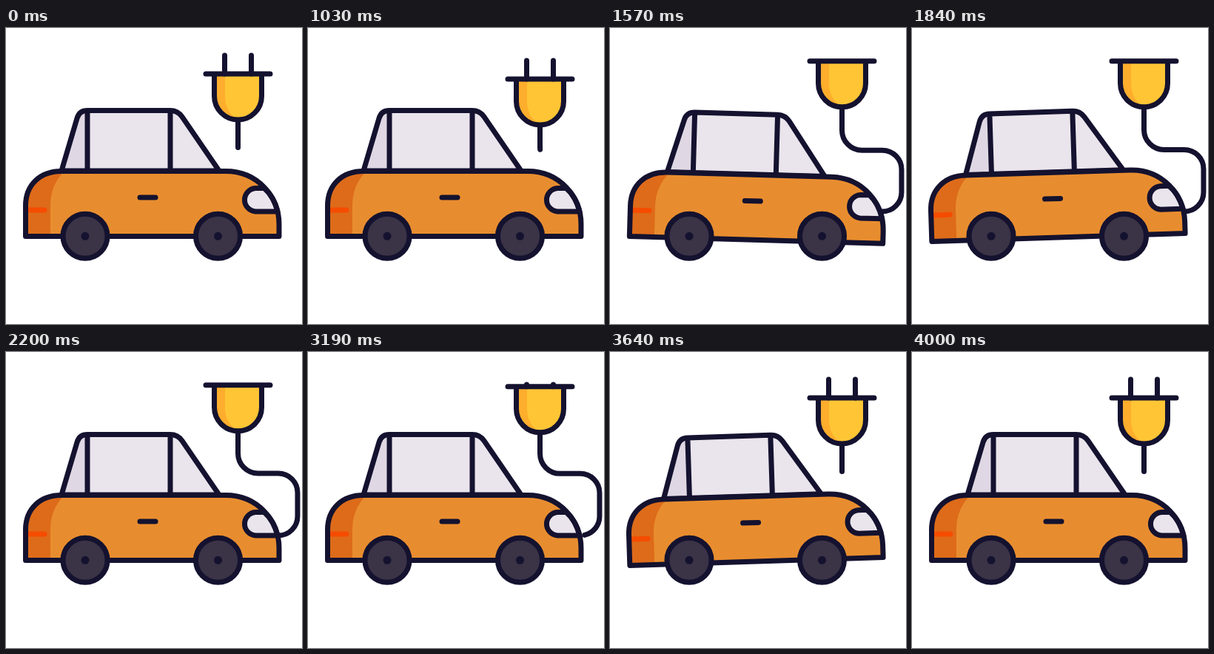
Recreate the animation shown at these times as an HTML page. Size 400 by 400 pixels, loop 4030 ms.

```html
<!DOCTYPE html>
<html lang="en">
<head>
<meta charset="utf-8">
<title>Electric car</title>
<style>
  html, body { margin: 0; height: 100%; overflow: hidden; background: #fff; }
  svg { display: block; width: 100%; height: 100%; }
  .line { fill: none; stroke: #14122f; stroke-width: 7; stroke-linecap: round; stroke-linejoin: round; }
  .glass { fill: #eae4ec; }
  .wheel { fill: #3b3346; }
  .hub { fill: #14122f; }
</style>
</head>
<body>
<svg viewBox="0 0 400 400">
  <defs>
    <path id="body" d="M26.5 281.5V240C26.5 212 46 193.5 75 193.5H297C340 193.5 369 228 369 265V281.5Z"/>
    <g id="wheel">
      <circle class="line wheel" r="30"/>
      <circle class="hub" r="5.5"/>
    </g>
  </defs>
  <path id="cord" class="line"/>
  <g id="plug">
    <path fill="#ffc535" d="M281.5 0V30a32 32 0 0 0 64 0V0Z"/>
    <path fill="#ffad2c" d="M281.5 0H296V32Q297 52 313.5 62A32 32 0 0 1 281.5 30Z"/>
    <path class="line" d="M281.5 0V30a32 32 0 0 0 64 0V0M270 0H357"/>
    <path id="prongs" class="line"/>
  </g>
  <g id="car">
    <path class="glass" d="M75 193L96 122Q99 111.5 110 111.5H222Q232 111.5 238 120L288 193Z"/>
    <path fill="#dfd8e4" d="M75 193L96 122Q99 111.5 110 111.5V193Z"/>
    <path class="line" d="M75 193L96 122Q99 111.5 110 111.5H222Q232 111.5 238 120L288 193ZM110 112V193M222 112V193"/>
    <use href="#body" fill="#e88d2f"/>
    <path fill="#dd6b1a" d="M26.5 281.5V240C26.5 212 46 193.5 75 193.5H79Q60 212 60 240V281.5Z"/>
    <path class="line" style="stroke:#f54c00" d="M31 246H52"/>
    <path class="line glass" d="M349 216.5H337A15.8 15.8 0 0 0 337 248H367C364 236 359 225 349 216.5Z"/>
    <use href="#body" class="line"/>
    <path class="line" d="M181 229H202"/>
  </g>
  <use href="#wheel" x="107" y="281.3"/>
  <use href="#wheel" x="286.5" y="281.3"/>
</svg>
<script>
const LOOP = 4030, STEP = 30;
const [cord, plug, prongs, car] =
  ['cord', 'plug', 'prongs', 'car'].map(id => document.getElementById(id));

const progress = (t, from, to) => Math.min(1, Math.max(0, (t - from) / (to - from)));

// Smooth move from 0 to 1.
function ease(t, from, to) {
  const p = progress(t, from, to);
  return p * p * (3 - 2 * p);
}

// Smooth swing from 0 to 1 and back.
const hump = (t, from, to) => Math.sin(Math.PI * progress(t, from, to)) ** 2;

function draw(t) {
  const plugged = ease(t, 1060, 1330) - ease(t, 3160, 3300);
  const cordOut = ease(t, 1060, 1400) - ease(t, 3160, 3370);
  const dip = 14 * hump(t, 1000, 1120);
  const bounce = 9 * hump(t, 3290, 3410) - 3 * hump(t, 3410, 3530);
  const plugY = 62 - 17.2 * plugged + dip + bounce;

  // The car nods forward, then back, both when plugged in and when released.
  const rock = t < 3190 ? t - 1390 : t - 3190;
  const forward = hump(rock, 0, 340), back = hump(rock, 140, 810);
  const drop = 4.9 * forward + 1.6 * back;
  const tilt = 1.7 * forward - 1.85 * back;
  car.setAttribute('transform', `translate(0 ${drop}) rotate(${tilt} 197 274)`);

  plug.setAttribute('transform', `translate(0 ${plugY})`);
  const length = 25 * (1 - plugged);
  prongs.setAttribute('d', length > 0.1 ? `M295.5 0v${-length}M331.5 0v${-length}` : '');

  const slack = 24 * (1 - plugged) ** 2 + drop / 4;
  cord.setAttribute('d', `M313.5 ${plugY + 62}V${137 + slack}a27 27 0 0 0 27 27H368` +
    'a26 26 0 0 1 26 26V222a26 26 0 0 1 -26 26');
  cord.setAttribute('stroke-dasharray', `${37.5 + 177.5 * cordOut - 0.6 * dip} 999`);
}

const start = performance.now();
function tick() {
  const t = (performance.now() - start) % LOOP;
  draw(Math.floor((t - 10) / STEP) * STEP + 10);
  requestAnimationFrame(tick);
}
tick();
</script>
</body>
</html>
```
